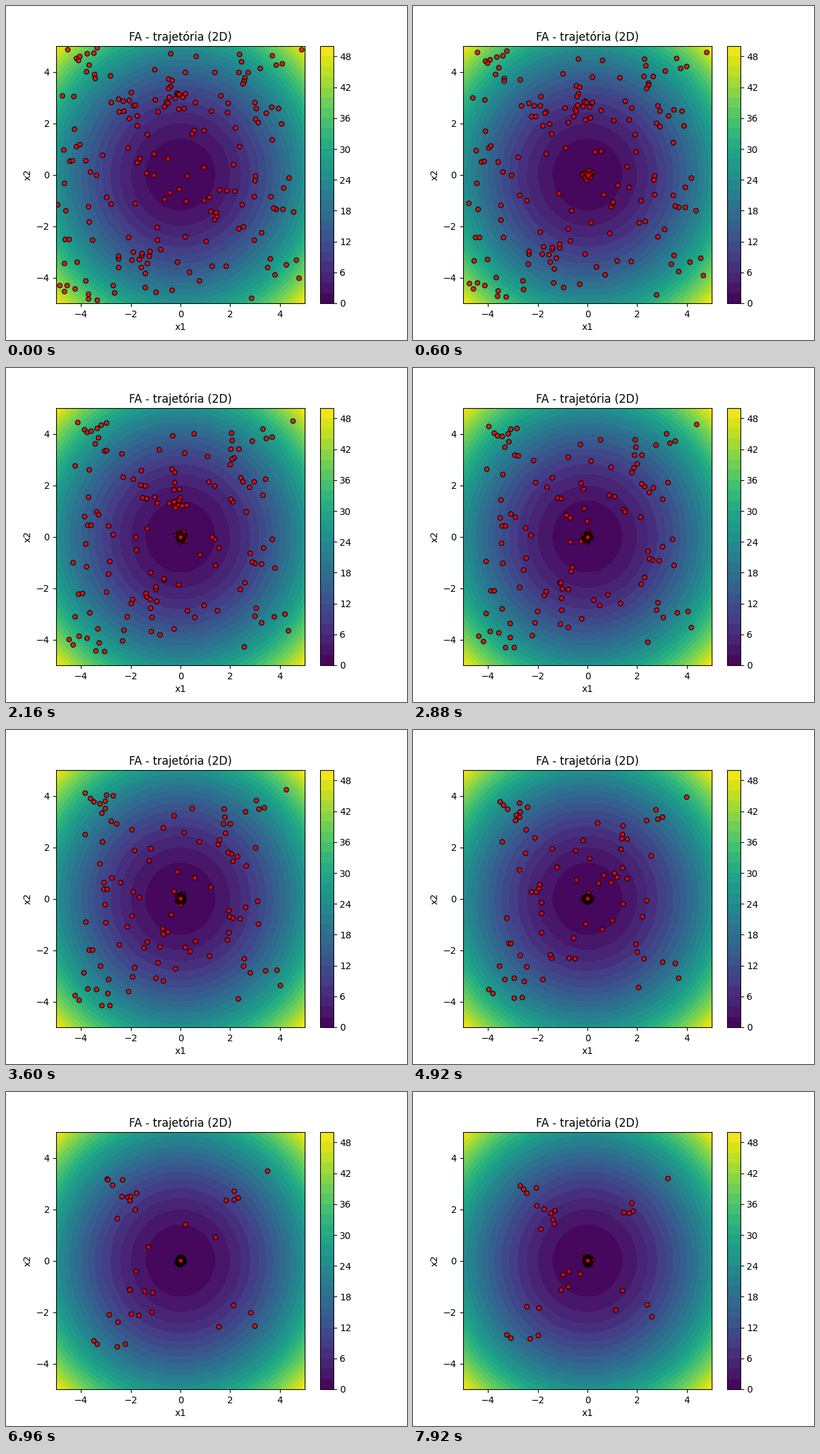
These frames come from a looping animation (600x500 px, 8 s). A matplotlib script:

```python
import numpy as np
import matplotlib.pyplot as plt
from matplotlib.animation import FuncAnimation

TICK = 40        # ms per animation frame
HOLD = 3         # frames each swarm step stays
FRAMES = 200
POWER = 2.5      # the nearer the optimum, the faster a firefly flies
LIMIT = 4.97

# groups in the starting swarm: x, y, spread, count
GROUPS = [(-0.35, 3.2, 0.35, 14), (-2.2, 2.8, 0.4, 9), (-1.8, -3.3, 0.4, 9),
          (2.4, 3.8, 0.3, 5), (-3.8, 4.3, 0.25, 6)]
CORNER = (4.87, 4.87)


def make_start(n_free=142):
    rng = np.random.default_rng(11)
    parts = [rng.normal((x, y), s, (n, 2)) for x, y, s, n in GROUPS]
    free = rng.uniform(-LIMIT, LIMIT, (n_free, 2))
    return np.vstack([[CORNER], free, *parts])


START = make_start()
RADIUS = np.hypot(*START.T)
# loss of radius**POWER per second; a little higher in the corners
SPEED = 6.4 + 1.3 * np.maximum(RADIUS - 4, 0)
SPEED[1:] *= np.random.default_rng(5).uniform(0.85, 1.25, len(START) - 1)


def swarm(step):
    """Firefly positions at a step, the brightest (most central) one last."""
    t = step * TICK * HOLD / 1000
    r = np.maximum(RADIUS ** POWER - SPEED * t, 0) ** (1 / POWER)
    pts = START * (r / RADIUS)[:, None]
    sigma = (0.055 + 0.05 * np.exp(-t / 2)) * np.exp(-2 * r)
    noise = np.random.default_rng(step).normal(size=pts.shape)
    pts = np.clip(pts + sigma[:, None] * noise, -LIMIT, LIMIT)
    return pts[np.argsort(-np.hypot(*pts.T))]


fig, ax = plt.subplots(figsize=(6, 5), dpi=100)
axis = np.linspace(-5, 5, 100)
X, Y = np.meshgrid(axis, axis)
bands = ax.contourf(X, Y, X ** 2 + Y ** 2, levels=np.arange(0, 51, 2),
                    cmap="viridis")
fig.colorbar(bands, ax=ax)
ax.set(xlim=(-5, 5), ylim=(-5, 5), xlabel="x1", ylabel="x2",
       title="FA - trajetória (2D)")
dots = ax.scatter(*swarm(0).T, s=25, c="red", edgecolors="black",
                  linewidths=1, alpha=0.8)


def update(i):
    dots.set_offsets(swarm(i // HOLD))
    return dots,


anim = FuncAnimation(fig, update, frames=FRAMES, interval=TICK,
                     init_func=lambda: update(0), repeat=True, repeat_delay=0)
plt.show()
```
